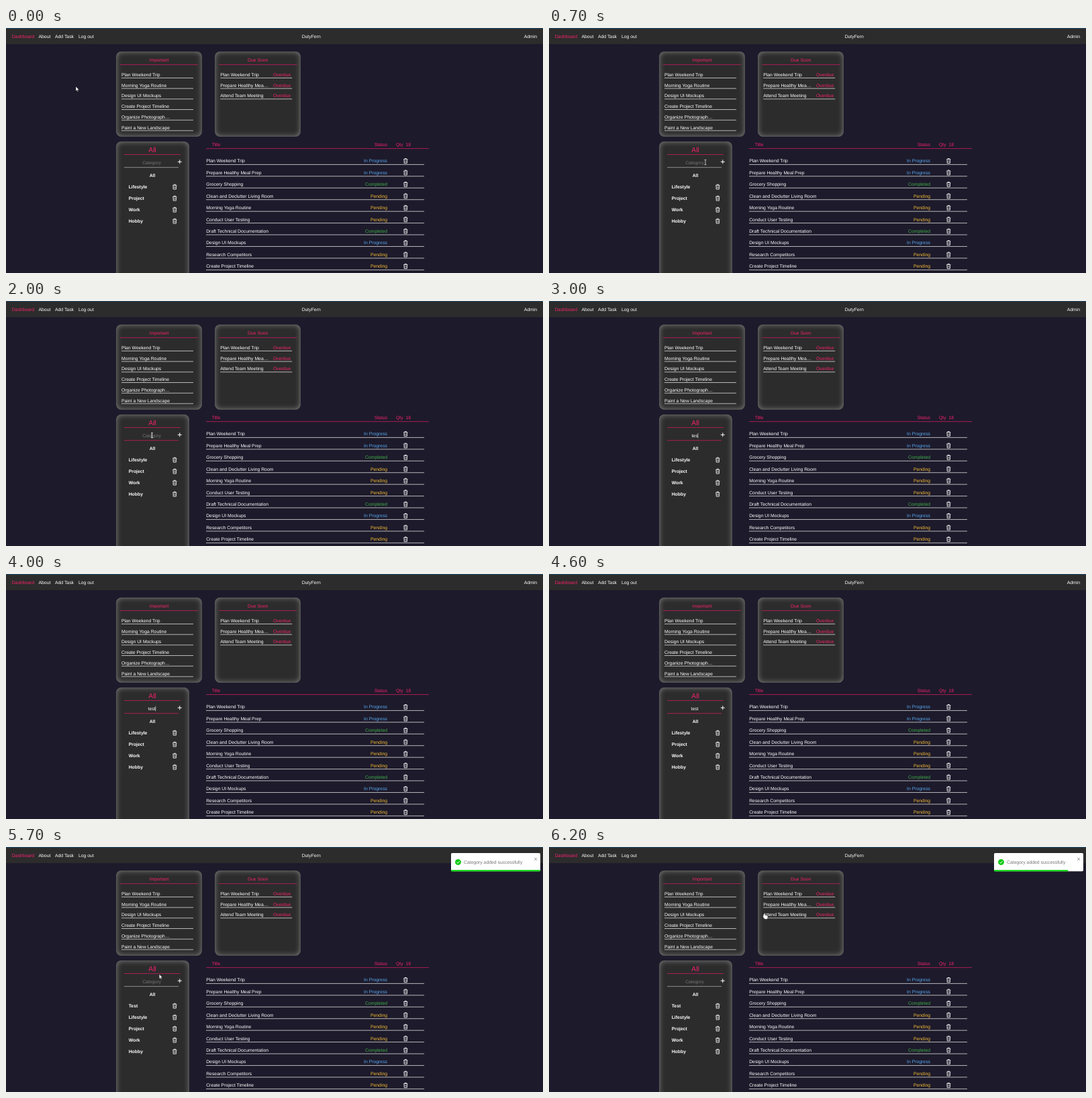
Write an HTML page that moves like this. It is 800 px wide and 365 px high and loops after 6300 ms.

```html
<!DOCTYPE html>
<html lang="en">
<head>
<meta charset="utf-8">
<style>
  html, body { margin: 0; width: 100%; height: 100%; overflow: hidden; background: #1d1a2b; }
  body { position: relative; }
  nav, .card, svg { position: absolute; left: 0; top: 0; }
  nav { width: 800px; height: 24px; background: #2c2c2c; box-shadow: inset 0 1px #1c4767; }
  .card { background: #2c2c2c; border-radius: 8px; box-shadow: inset 0 0 8.5px #858585; }
  text { font: 6.83px "Liberation Sans", Arial, sans-serif; fill: #fff; text-rendering: geometricPrecision; }
</style>
</head>
<body>
<nav></nav>
<div class="card" style="left:164px;top:35px;width:128px;height:127px"></div>
<div class="card" style="left:311px;top:35px;width:128px;height:127px"></div>
<div class="card" style="left:164px;top:169px;width:108.5px;height:230px"></div>
<svg id="stage" width="800" height="365" viewBox="0 0 800 365">
  <defs>
    <g id="trash" fill="none" stroke="#fff" stroke-width=".8">
      <path d="M-3-2.5H3M-1.2-2.6V-3.6H1.2V-2.6M-2.4-2.3-2.1 3.4H2.1L2.4-2.3"/>
      <path d="M-.9-1V2.2M.9-1V2.2" stroke-width=".6"/>
    </g>
  </defs>
  <g id="page"></g>
  <g id="field"></g>
  <g id="list"></g>
  <g id="toast">
    <rect x="662.6" y="8.8" width="133.6" height="28" rx="2" fill="#000" opacity=".25"/>
    <rect x="663" y="9" width="133" height="27.3" rx="1.7" fill="#fff"/>
    <circle cx="673.5" cy="22.5" r="4" fill="#07c80c" stroke="#07c80c" stroke-dasharray="2.1 1.04"/>
    <path d="M671.4 22.6 673 24.2 675.8 21" fill="none" stroke="#fff"/>
    <text x="682" y="24.8" style="fill:#757575">Category added successfully</text>
    <path d="M787 16 791 20M791 16 787 20" stroke="#8a8a8a" stroke-width=".8"/>
    <rect id="progress" x="663" y="34.2" width="133" height="2.1" fill="#07d80c"/>
  </g>
  <g id="cursor">
    <path id="arrow" d="M0 0V7L1.6 5.6 2.7 8 3.7 7.5 2.6 5.2H4.8Z" fill="#fff" stroke="#111" stroke-width=".4"/>
    <path id="beam" d="M-1.5-3.6H1.5M0-3.6V3.6M-1.5 3.6H1.5" stroke="#ddd" stroke-width=".8"/>
    <path id="hand" d="M-.8.6Q0-.6.8.6V3.4L4.4 4.2Q5.2 4.6 5 6L4.4 9.5H.3L-2.2 6Q-2-.2 4.9-.8 5.4Z" fill="#fff" stroke="#111" stroke-width=".4"/>
  </g>
</svg>
<script>
const LOOP = 6300, STEP = 100;
const PINK = '#f5226c', DIM_PINK = '#b31f57', LINE = '#c8c8c8';
const STATUS = { 'In Progress': '#58a8ee', Completed: '#3fae49', Pending: '#efb935' };
const FOCUS = 1100, CLEAR = 4700, ADDED = 5400, TOAST = 4970;
const typed = [[2500, 't'], [2700, 'te'], [2900, 'tes'], [3100, 'test']];

const $ = id => document.getElementById(id);
const text = (x, y, s, fill = '#fff', anchor = 'start', style = '') =>
  `<text x="${x}" y="${y}" text-anchor="${anchor}" style="fill:${fill};${style}">${s}</text>`;
const line = (x1, x2, y, color = LINE) =>
  `<path d="M${x1} ${y}H${x2}" stroke="${color}" stroke-width=".9"/>`;
const trash = (x, y) => `<use href="#trash" x="${x}" y="${y}"/>`;
const show = (id, on) => { $(id).style.display = on ? '' : 'none'; };

function panel(x, title, rows, note = '') {
  return text(x + 56, 50, title, PINK, 'middle') + line(x - 2, x + 114, 54.6, DIM_PINK) +
    rows.map((row, i) => {
      const y = 72 + 15.7 * i;
      return text(x, y, row) + text(x + 105, y, note, PINK, 'end') + line(x, x + 107, y + 2.4);
    }).join('');
}

const tasks = [
  ['Plan Weekend Trip', 'In Progress'], ['Prepare Healthy Meal Prep', 'In Progress'],
  ['Grocery Shopping', 'Completed'], ['Clean and Declutter Living Room', 'Pending'],
  ['Morning Yoga Routine', 'Pending'], ['Conduct User Testing', 'Pending'],
  ['Draft Technical Documentation', 'Completed'], ['Design UI Mockups', 'In Progress'],
  ['Research Competitors', 'Pending'], ['Create Project Timeline', 'Pending']
];

$('page').innerHTML =
  text(8.7, 14.6, 'Dashboard', PINK) + text(48.5, 14.6, 'About') + text(73, 14.6, 'Add Task') +
  text(108, 14.6, 'Log out') + text(454.7, 14.6, 'DutyFern', '#fff', 'middle') +
  text(791, 14.6, 'Admin', '#fff', 'end') +
  panel(172, 'Important', ['Plan Weekend Trip', 'Morning Yoga Routine', 'Design UI Mockups',
    'Create Project Timeline', 'Organize Photograph…', 'Paint a New Landscape']) +
  panel(319.2, 'Due Soon', ['Plan Weekend Trip', 'Prepare Healthy Mea…', 'Attend Team Meeting'], 'Overdue') +
  text(218, 185.4, 'All', PINK, 'middle', 'font-size:10.24px') + line(176, 260, 188.5, DIM_PINK) +
  '<path d="M255.8 199.3H261.8M258.8 196.3V202.3" stroke="#fff"/>' +
  text(218, 222, 'All', '#fff', 'middle', 'font-weight:bold') +
  text(306.7, 176, 'Title', PINK) + text(568, 176, 'Status', PINK, 'end') +
  text(581, 176, 'Qty', PINK) + text(603, 176, '18', PINK, 'end') + line(298, 630, 179.6, DIM_PINK) +
  tasks.map(([title, status], i) => {
    const y = 200.4 + 17.44 * i;
    return text(298.2, y, title) + text(568, y, status, STATUS[status], 'end') +
      trash(595.3, y - 2.3) + line(298, 623, y + 3);
  }).join('');

function drawField(t) {
  const focused = t >= FOCUS && t < ADDED;
  const value = t < CLEAR ? typed.filter(k => k[0] <= t).pop()?.[1] ?? '' : '';
  const lastEdit = Math.max(...[FOCUS, ...typed.map(k => k[0]), CLEAR].filter(k => k <= t));
  $('field').innerHTML = line(176, 257, 207.7, focused ? DIM_PINK : '#999') +
    text(217, 202.8, value || 'Category', value ? '#fff' : '#757575', 'middle');
  if (focused && (t - lastEdit) % 900 < 450) {
    const x = 217.3 + (value ? $('field').lastChild.getComputedTextLength() / 2 : 0);
    $('field').innerHTML += `<path d="M${x} 196.8V204.4" stroke="#fff" stroke-width=".6"/>`;
  }
}

function drawList(t) {
  const names = ['Lifestyle', 'Project', 'Work', 'Hobby'];
  if (t >= ADDED) names.unshift('Test');
  $('list').innerHTML = names.map((name, i) =>
    text(182.7, 239.2 + 17 * i, name, '#fff', 'start', 'font-weight:bold') + trash(251.3, 236.8 + 17 * i)).join('');
}

// Bounce in from the right, each segment eased out.
function drawToast(t) {
  const p = (t - TOAST) / 700;
  show('toast', p >= 0);
  const stops = [[0, 1280], [.6, -10.7], [.75, 4.3], [.9, -2.1], [1, 0]];
  const ease = u => 1 - (1 - u) ** 3;
  let x = 0;
  for (let i = 1; i < stops.length; i++) {
    const [a, from] = stops[i - 1], [b, to] = stops[i];
    if (p >= a && p < b) x = from + (to - from) * ease((p - a) / (b - a));
  }
  $('toast').setAttribute('transform', `translate(${x})`);
  $('toast').setAttribute('opacity', ease(Math.min(1, Math.max(0, p / .6))));
  $('progress').setAttribute('width', 133 * (1 - Math.max(0, t - 5690) / 3000));
}

const path = [[0, 104, 87], [100, 104, 87], [600, 233, 200], [700, 233, 200], [1000, 217.5, 200],
  [5600, 217.5, 200], [6100, 321, 98], [LOOP, 321, 98]];

function drawCursor(t) {
  const i = path.findIndex(k => k[0] > t);
  const [a, x0, y0] = path[i - 1], [b, x1, y1] = path[i];
  const u = (t - a) / (b - a), s = u * u * (3 - 2 * u);
  const x = x0 + (x1 - x0) * s, y = y0 + (y1 - y0) * s;
  const inField = x > 176 && x < 254 && y > 193 && y < 208;
  const onTask = y > 62 && y < 154 && (x > 172 && x < 279 || x > 319 && x < 426);
  show('cursor', t < typed[0][0] || t >= 5600);
  show('beam', inField);
  show('hand', onTask);
  show('arrow', !inField && !onTask);
  $('cursor').setAttribute('transform', `translate(${x} ${y})`);
}

function frame(now) {
  const t = Math.floor(now % LOOP / STEP) * STEP;
  drawField(t);
  drawList(t);
  drawToast(t);
  drawCursor(t);
  requestAnimationFrame(frame);
}
frame(0);
</script>
</body>
</html>
```
